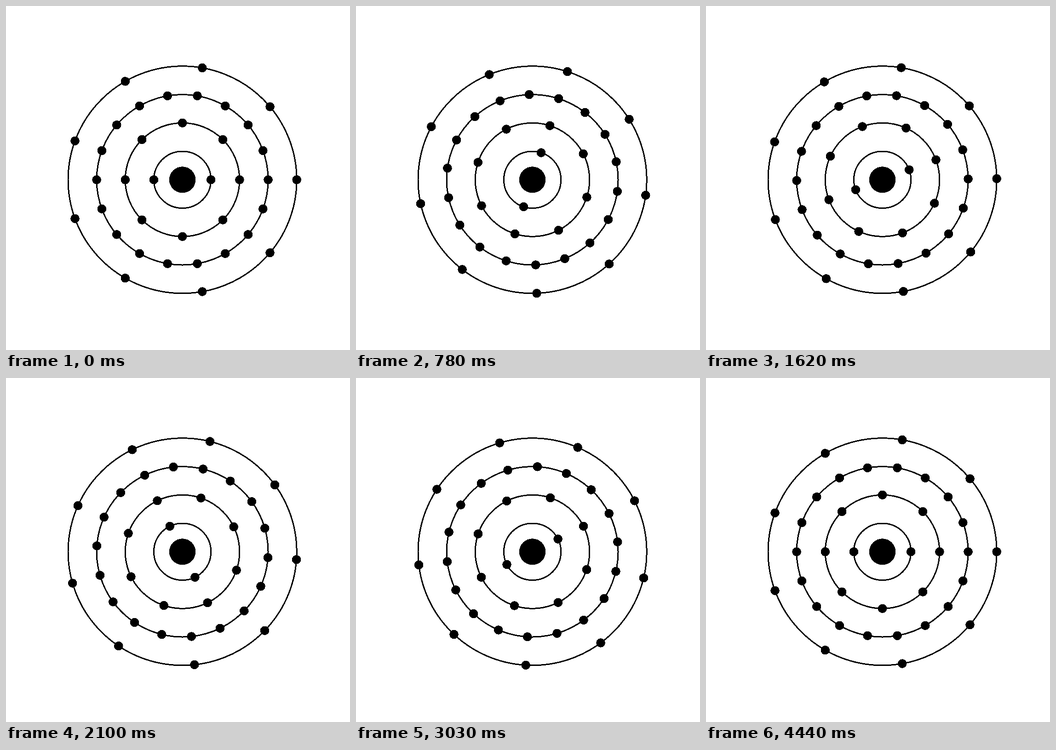
Write an HTML page that moves like this. It is 748 px wide and 748 px high and loops after 4500 ms.

```html
<!DOCTYPE html>
<html lang="en">
<head>
<meta charset="utf-8">
<title>Electron shells</title>
<style>
  html, body { margin: 0; width: 100%; height: 100%; overflow: hidden; background: #fff; }
  svg { display: block; width: 100%; height: 100%; shape-rendering: crispEdges; }
</style>
</head>
<body>
<svg viewBox="0 0 748 748">
  <g id="atom" transform="translate(383.6 377.8) scale(1 .9937)"></g>
</svg>
<script>
  const SHELLS = [2, 8, 18, 9];
  const GAP = 62.15;
  const STEP = 30;
  const STEPS = 150;
  const SWEEP = 765;
  const atom = document.getElementById('atom');

  function add(parent, tag, attrs) {
    const el = document.createElementNS('http://www.w3.org/2000/svg', tag);
    for (const key in attrs) el.setAttribute(key, attrs[key]);
    return parent.appendChild(el);
  }

  add(atom, 'circle', { r: 28.7 });
  SHELLS.forEach((_, i) => add(atom, 'circle', {
    r: GAP * (i + 1), fill: 'none', stroke: '#000', 'stroke-width': 3
  }));

  const electrons = SHELLS.flatMap((count, i) =>
    Array.from({ length: count }, (_, k) => ({
      radius: GAP * (i + 1),
      angle: 2 * Math.PI * k / count,
      el: add(atom, 'circle', { r: 9.8 })
    })));

  // Starts at rest, then spins clockwise and slows with a cubic ease-out.
  function turnAt(step) {
    if (step === 0) return 0;
    return SWEEP * (1 - step / STEPS) ** 3 * Math.PI / 180;
  }

  const start = performance.now();
  let shown = -1;

  function draw() {
    const step = Math.floor((performance.now() - start) / STEP) % STEPS;
    if (step !== shown) {
      shown = step;
      const turn = turnAt(step);
      for (const { radius, angle, el } of electrons) {
        el.setAttribute('cx', radius * Math.cos(angle + turn));
        el.setAttribute('cy', -radius * Math.sin(angle + turn));
      }
    }
    requestAnimationFrame(draw);
  }
  draw();
</script>
</body>
</html>
```
